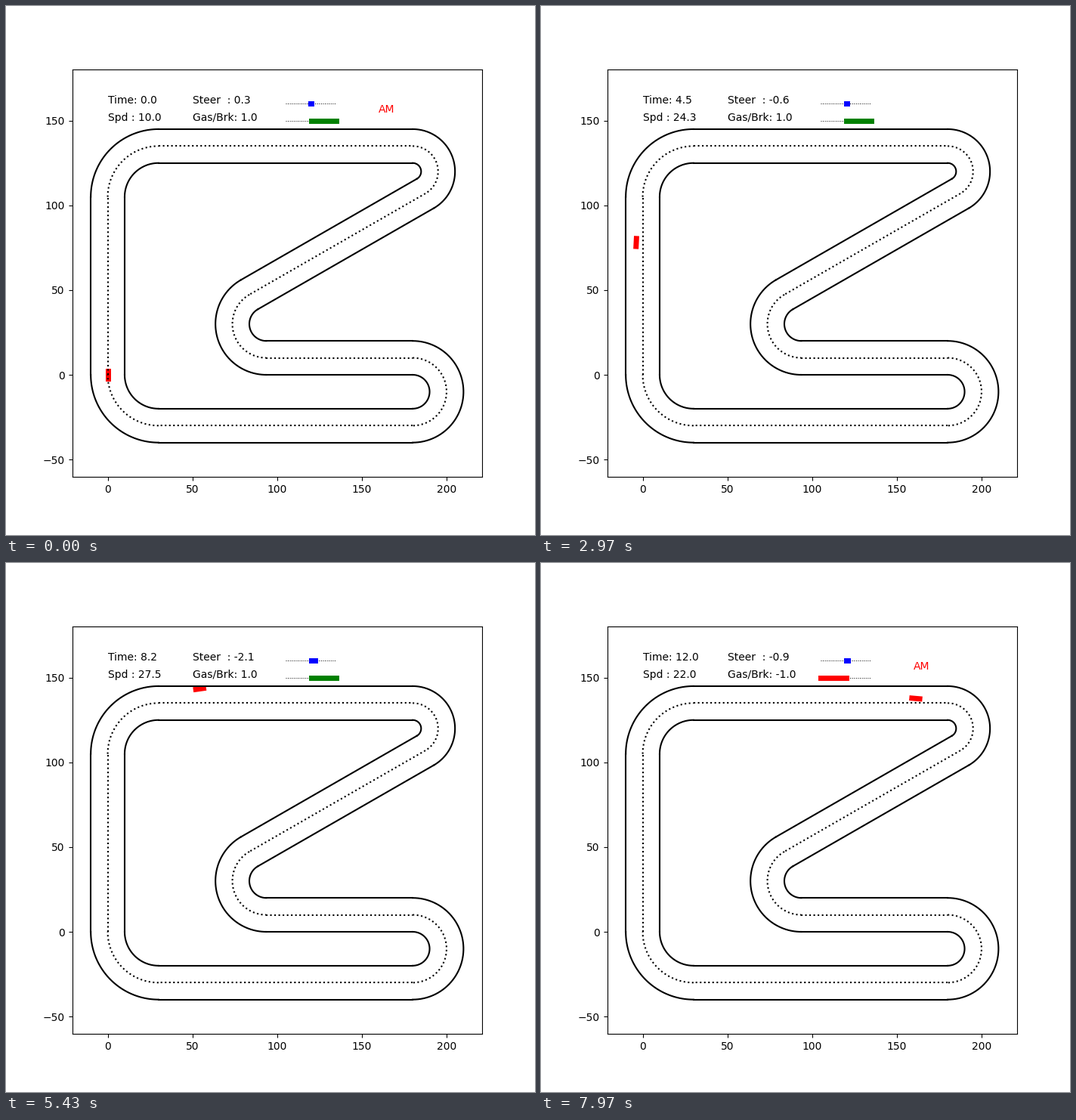
Animation of 700 by 700 pixels, one loop 8 s. Source, as a matplotlib script:

```python
import numpy as np
import matplotlib.pyplot as plt
from matplotlib.animation import FuncAnimation

FRAMES, INTERVAL = 320, 25
DT = 0.05               # simulated seconds per step
HALF_WIDTH = 10
CAR_LENGTH = 4.6
CORNER = (4.7, 7.6)     # part throttle
BRAKE_AT = 10.62
AM_OFF = [(3.2, 5.1), (7.0, 9.4)]

# Key states: time, x, y, heading (deg), speed, steer (deg)
KEYS = np.array([
    (0.00, 0.0, 0.0, 90, 10.0, 0.3),
    (1.70, -2.0, 22.1, 95.5, 15.9, -0.34),
    (4.45, -3.8, 78.1, 87, 24.3, -0.6),
    (5.80, 4.4, 110.8, 62, 25.3, -2.7),
    (8.15, 54.3, 143.4, 8, 27.5, -2.1),
    (10.60, 126.0, 140.0, -4, 30.0, 0.2),
    (11.95, 161.2, 137.7, -5, 22.0, -0.9),
])
TIMES = KEYS[:, 0]


def pose(t):
    """Position and unit heading on a Hermite curve through the key states."""
    i = np.clip(np.searchsorted(TIMES, t, side="right") - 1, 0, len(KEYS) - 2)
    a, b = KEYS[i], KEYS[i + 1]
    span = b[0] - a[0]
    s = (t - a[0]) / span
    p0, p1 = a[1:3], b[1:3]
    m0, m1 = (span * k[4] * np.array([np.cos(h), np.sin(h)])
              for k, h in ((a, np.radians(a[3])), (b, np.radians(b[3]))))
    pos = ((2 * s**3 - 3 * s**2 + 1) * p0 + (s**3 - 2 * s**2 + s) * m0
           + (3 * s**2 - 2 * s**3) * p1 + (s**3 - s**2) * m1)
    vel = (6 * (s**2 - s) * (p0 - p1) + (3 * s**2 - 4 * s + 1) * m0
           + (3 * s**2 - 2 * s) * m1)
    return pos, vel / np.hypot(*vel)


def throttle(t):
    if t > BRAKE_AT:
        return -1.0
    return 0.5 if CORNER[0] < t < CORNER[1] else 1.0


fig = plt.figure(figsize=(7, 7), dpi=100)
ax = fig.add_subplot()

LANES = [(-HALF_WIDTH, "k-"), (0, "k:"), (HALF_WIDTH, "k-")]


def straight(p, q):
    p, q = np.array(p), np.array(q)
    dx, dy = (q - p) / np.hypot(*(q - p))
    for d, style in LANES:
        ax.plot([p[0] - d * dy, q[0] - d * dy],
                [p[1] + d * dx, q[1] + d * dx], style)


def arc(cx, cy, r, start, end):
    a = np.radians(np.linspace(start, end, 60))
    for d, style in LANES:
        ax.plot(cx + (r + d) * np.cos(a), cy + (r + d) * np.sin(a), style)


straight((0, 0), (0, 105))
arc(30, 105, 30, 180, 90)
straight((30, 135), (180, 135))
arc(180, 120, 15, 90, -60)
straight((187.5, 107.01), (83.6, 47.32))
arc(93.6, 30, 20, 120, 270)
straight((93.6, 10), (180, 10))
arc(180, -10, 20, 90, -90)
straight((180, -30), (30, -30))
arc(30, 0, 30, 270, 180)

for y in (160, 150):
    ax.plot([105, 135], [y, y], "k:", lw=0.7)
car, = ax.plot([], [], "r", lw=5, zorder=1.9)
steer_bar, = ax.plot([], [], "b", lw=5)
gas_bar, = ax.plot([], [], "g", lw=5)
ax.axis("equal")

time_text = ax.text(0, 160, "")
speed_text = ax.text(0, 150, "")
steer_text = ax.text(50, 160, "")
gas_text = ax.text(50, 150, "")
am_text = ax.text(160, 155, "AM", color="r")


def update(n):
    # Three simulation steps per four drawn frames
    t = (3 * n + 2) // 4 * DT
    speed, steer = (np.interp(t, TIMES, KEYS[:, c]) for c in (4, 5))
    gas = throttle(t)

    (x, y), (ux, uy) = pose(t)
    k = CAR_LENGTH / 2
    car.set_data([x - k * ux, x + k * ux], [y - k * uy, y + k * uy])

    steer_bar.set_data([120, 120 - 1.25 * steer], [160, 160])
    gas_bar.set_data([120, 120 + 15 * gas], [150, 150])
    gas_bar.set_color("g" if gas >= 0 else "r")

    time_text.set_text(f"Time: {t + 1e-9:.1f}")
    speed_text.set_text(f"Spd : {speed:.1f}")
    steer_text.set_text(f"Steer  : {steer:.1f}")
    gas_text.set_text(f"Gas/Brk: {gas:.1f}")
    am_text.set_visible(not any(a <= t < b for a, b in AM_OFF))
    return (car, steer_bar, gas_bar, time_text, speed_text,
            steer_text, gas_text, am_text)


anim = FuncAnimation(fig, update, frames=FRAMES, interval=INTERVAL,
                     init_func=lambda: update(0), repeat=True, repeat_delay=0)
plt.show()
```
